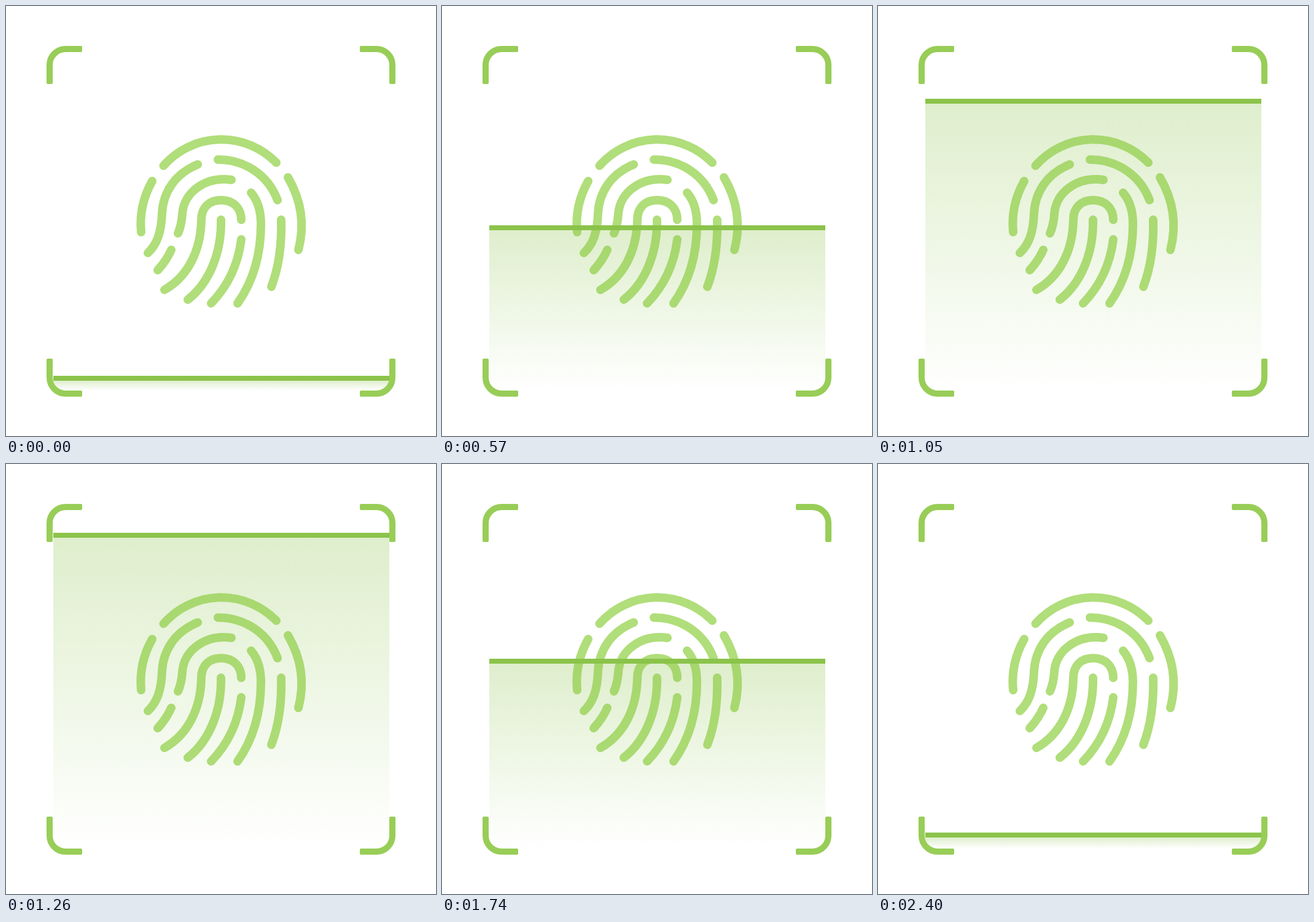
An HTML page for the animation above (2.73 s loop, 700 by 700 pixels).

```html
<!DOCTYPE html>
<html lang="en">
<head>
<meta charset="utf-8">
<title>Fingerprint scan</title>
<style>
  html, body { margin: 0; height: 100%; overflow: hidden; background: #fff; }
  svg { display: block; width: 100%; height: 100%; }
  #ridges { fill: none; stroke: #b0de7a; stroke-width: 14; stroke-linecap: round; }
  #corners { fill: #98cd57; stroke: #98cd57; stroke-width: 4; stroke-linejoin: round; }
</style>
</head>
<body>
<svg viewBox="0 0 700 700">
  <defs>
    <linearGradient id="fade" x2="0" y2="1">
      <stop stop-color="#8bc34a" stop-opacity=".28"/>
      <stop offset="1" stop-color="#8bc34a" stop-opacity="0"/>
    </linearGradient>
    <path id="corner" d="M68 125V96A29 29 0 0 1 97 67H122V73H97A23 23 0 0 0 74 96V125Z"/>
  </defs>
  <g id="ridges">
    <path d="M256.5 260A125 125 0 0 1 440 255"/>
    <path d="M238 285C225 308 217 336 220 368"/>
    <path d="M459 279C480 315 487 355 476 397"/>
    <path d="M312 258C275 273 256 303 254 337C253 368 246 388 231 402"/>
    <path d="M345 250C390 250 427 276 442 316"/>
    <path d="M367 283C325 277 289 303 287 339C286 352 284 361 280 370"/>
    <path d="M383 348C383 328 369 316 350 316S318 328 318 348C317 400 295 441 258 462"/>
    <path d="M350 348C351 400 332 450 296 478"/>
    <path d="M383 380C378 420 361 456 334 484"/>
    <path d="M399 304C411 318 415 335 415 355C415 402 404 446 377 484"/>
    <path d="M448 348C449 388 445 423 432 457"/>
    <path d="M269 397Q261 415 247 430"/>
  </g>
  <rect id="glow" x="77" width="547" fill="url(#fade)"/>
  <rect id="bar" x="77" width="547" height="8" fill="#8bc34a"/>
  <g id="corners">
    <use href="#corner"/>
    <use href="#corner" transform="matrix(-1 0 0 1 700 0)"/>
    <use href="#corner" transform="matrix(1 0 0 -1 0 701)"/>
    <use href="#corner" transform="matrix(-1 0 0 -1 700 701)"/>
  </g>
</svg>
<script>
  const LOOP = 2730, STEP = 30, SWEEP = 1200;
  const TOP = 86, START = 602, END = 600, FLOOR = 626;
  const bar = document.getElementById('bar');
  const glow = document.getElementById('glow');

  // Rise, fall, then rest until the loop restarts.
  function barY(time) {
    if (time < SWEEP) return START + (TOP - START) * time / SWEEP;
    return TOP + (END - TOP) * Math.min(1, (time - SWEEP) / SWEEP);
  }

  function draw() {
    const time = Math.floor(performance.now() % LOOP / STEP) * STEP;
    const y = Math.round(barY(time));
    bar.setAttribute('y', y);
    glow.setAttribute('y', y + 8);
    glow.setAttribute('height', FLOOR - y - 8);
    requestAnimationFrame(draw);
  }
  draw();
</script>
</body>
</html>
```
